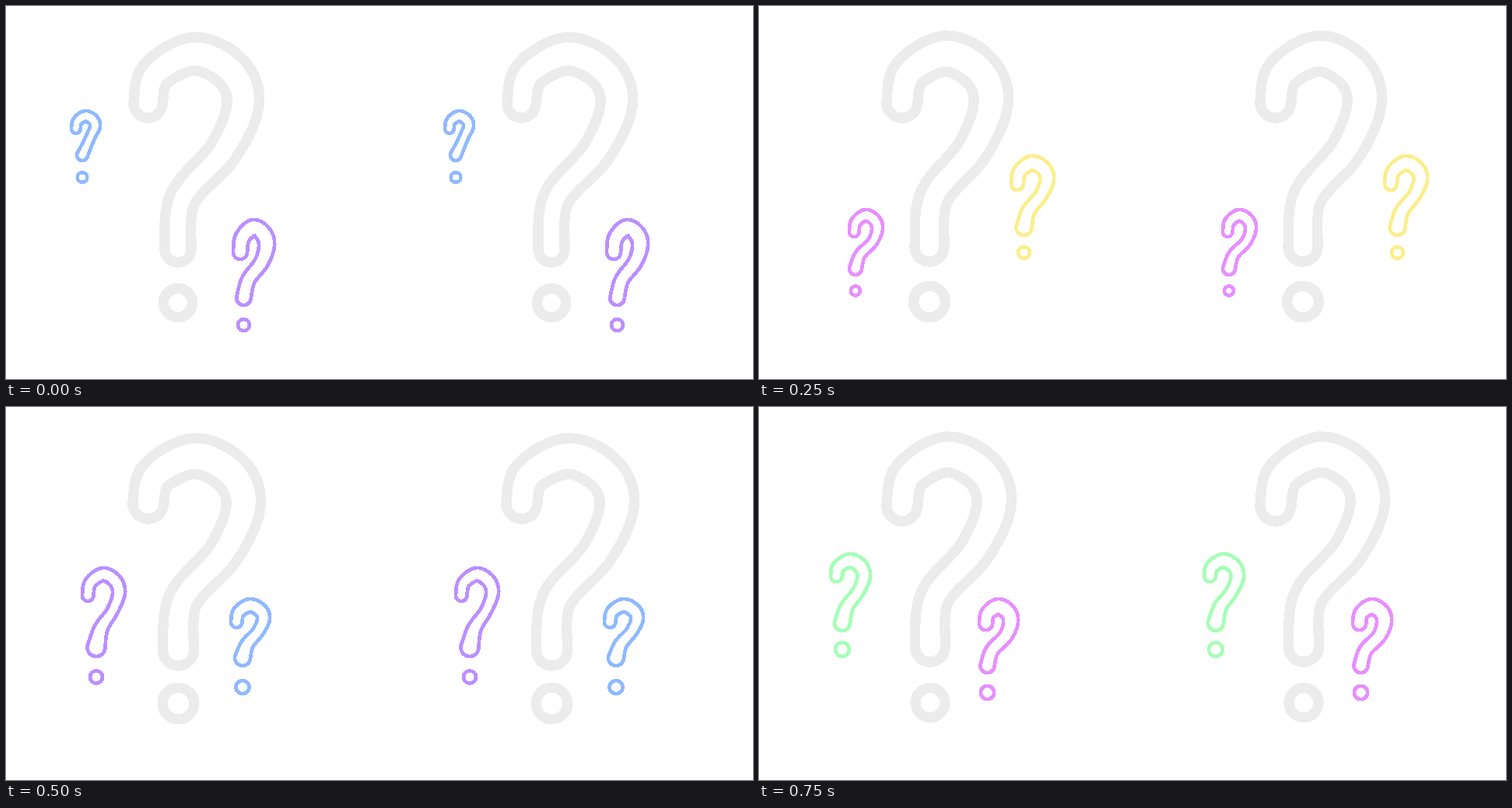
Write an HTML page that moves like this. It is 960 px wide and 480 px high and loops after 1 s.

```html
<!DOCTYPE html>
<html lang="en">
<head>
<meta charset="utf-8">
<title>Question marks</title>
<style>
html, body { margin: 0; height: 100%; overflow: hidden; background: #fff; }
svg { display: block; width: 960px; height: 480px; }
#poses { fill: none; stroke-linejoin: round; shape-rendering: crispEdges; }
</style>
</head>
<body>
<svg viewBox="0 0 960 480">
  <g id="poses"></g>
  <use href="#poses" x="480"/>
</svg>
<script>
const GREY = '#ececec', BLUE = '#8fb9ff', PURPLE = '#bb8fff',
      PINK = '#e88fff', YELLOW = '#fbee8c', GREEN = '#a4ffb5';
const STEPS = 8;  // samples between two key points

// Catmull-Rom spline through points of any dimension; t counts key points
function spline(points, t) {
  const i = Math.min(Math.floor(t), points.length - 2), f = t - i;
  const at = k => points[Math.max(0, Math.min(points.length - 1, k))];
  return points[0].map((_, k) => {
    const [a, b, c, d] = [-1, 0, 1, 2].map(n => at(i + n)[k]);
    return b + f / 2 * (c - a + f * (2 * a - 5 * b + 4 * c - d + f * (3 * (b - c) + d - a)));
  });
}

// Outline of a round-ended tube along points [x, y, radius]
function tube(points) {
  const outer = [], inner = [], last = points.length - 1;
  for (let n = 0; n <= last * STEPS; n++) {
    const t = n / STEPS;
    const [x, y, r] = spline(points, t);
    const [x0, y0] = spline(points, Math.max(0, t - .01));
    const [x1, y1] = spline(points, Math.min(last, t + .01));
    const angle = Math.atan2(y1 - y0, x1 - x0);
    const dx = r * Math.sin(angle), dy = -r * Math.cos(angle);
    outer.push([x + dx, y + dy]);
    inner.unshift([x - dx, y - dy]);
  }
  const cap = (r, to) => `A${r} ${r} 0 0 1 ${to}`;
  return `M${outer.join('L')}${cap(points[last][2], inner[0])}` +
    `L${inner.join('L')}${cap(points[0][2], outer[0])}Z`;
}

// Mark within a box: lobe = lowest y of the hook's tip, foot = x of the stem's end,
// r = half thickness of the hook, end = that of the stem
function mark(color, [left, top, right, bottom], lobe, foot, r, end, dotY, dotR) {
  const x0 = left + .9 * r, y0 = top + 1.05 * r, tip = lobe - .9 * r;
  const x = u => x0 + u * (right - r - x0);
  const y = v => y0 + v * (bottom - end - y0);
  const spine = [
    [x(0), tip, .9 * r],
    [x(.08), y0 + .4 * (tip - y0), .95 * r],
    [x(.49), y(0), 1.05 * r],
    [x(.88), y(.09), 1.05 * r],
    [x(1), y(.26), r],
    [x(.79), y(.5), .9 * r],
    [foot + 6, y(.74), .45 * (r + end)],
    [foot, y(1), end]
  ];
  return `<g stroke="${color}" stroke-width="${color === GREY ? 13.3 : 4.7}">` +
    `<path d="${tube(spine)}"/><circle cx="${foot}" cy="${dotY}" r="${dotR}"/></g>`;
}

const pose = (...marks) => `<g>${marks.join('')}</g>`;

const poses = document.getElementById('poses');
poses.innerHTML = pose(
  mark(GREY, [164, 40, 325, 330], 144, 221, 20.5, 17, 382, 18.5),
  mark(BLUE, [84, 135, 121, 199], 164, 98, 6.5, 7, 220.5, 6.3),
  mark(PURPLE, [292, 275, 345, 385], 326, 305.5, 10, 9.3, 410.5, 7.5)
) + pose(
  mark(GREY, [164, 38, 320, 329], 144, 219, 22, 19, 380.5, 20.3),
  mark(PINK, [116, 262, 159, 346], 297, 124, 7, 8, 366.5, 6),
  mark(YELLOW, [324, 193, 379, 295], 237, 340.5, 8.8, 10, 317.5, 7.5)
) + pose(
  mark(GREY, [163, 40, 327, 333], 144, 221.5, 22, 20, 381.5, 20.3),
  mark(PURPLE, [98, 207, 153, 321], 250, 116, 8, 11.5, 347.5, 8),
  mark(BLUE, [289, 247, 339, 333], 284, 304, 8, 10, 360.5, 8.5)
) + pose(
  mark(GREY, [164, 38, 324, 328], 147, 220, 22, 19.5, 380.5, 19),
  mark(GREEN, [92, 189, 143, 288], 225, 107, 8.3, 10, 312, 9),
  mark(PINK, [283, 247, 333, 342], 287, 293.5, 9.5, 9, 367.5, 8.6)
);

const start = performance.now();
function draw() {
  const now = Math.floor((performance.now() - start) / 250) % 4;
  [...poses.children].forEach((g, i) => g.style.display = i === now ? '' : 'none');
  requestAnimationFrame(draw);
}
draw();
</script>
</body>
</html>
```
